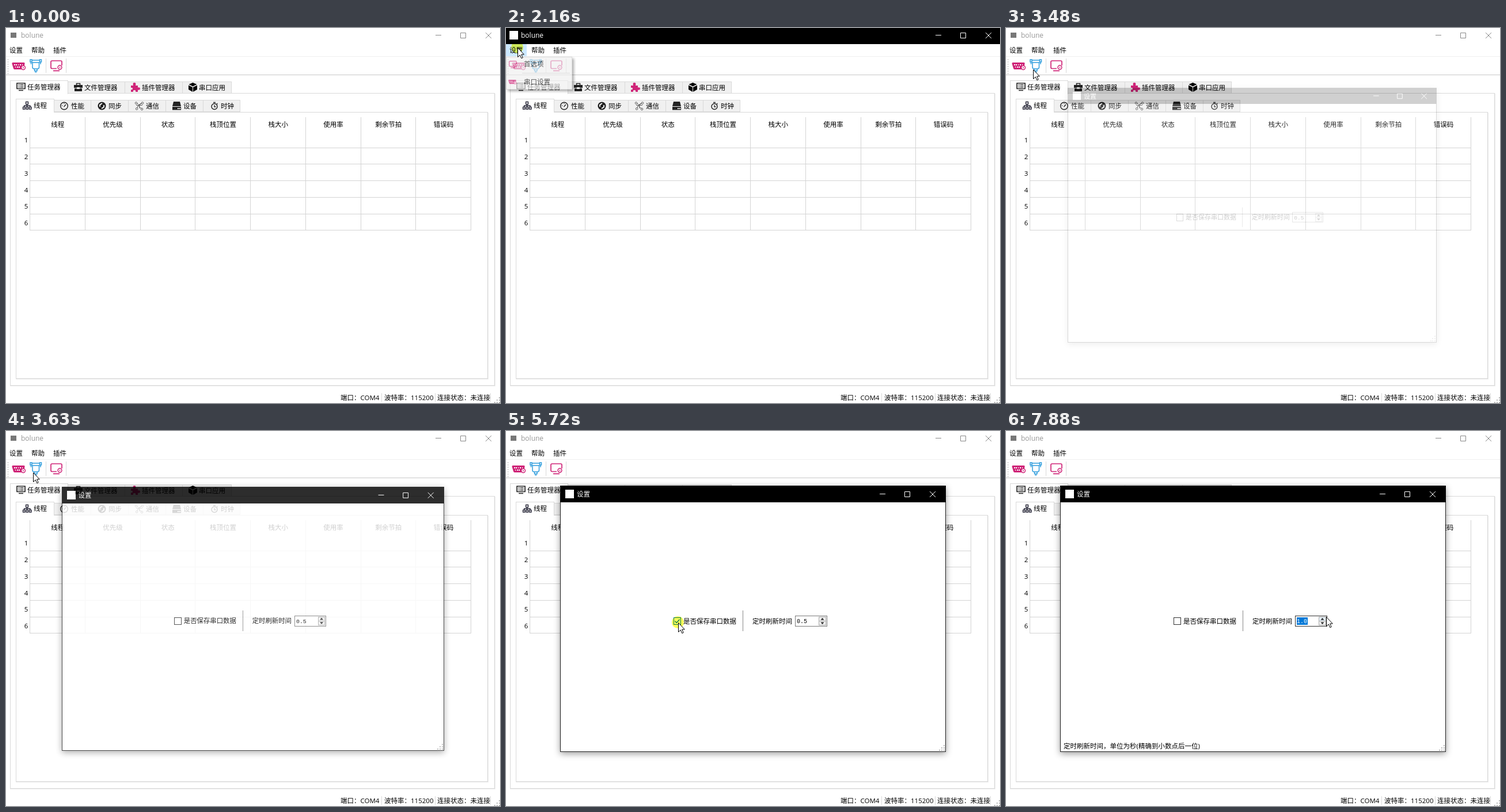
Animation, 858 px wide and 652 px high, one loop 8000 ms. Source, as an HTML page:

```html
<!DOCTYPE html>
<html lang="zh">
<head>
<meta charset="utf-8">
<style>
html, body { margin: 0; width: 100%; height: 100%; overflow: hidden; background: #fff }
svg { display: block; width: 858px; height: 652px }
text { font: 11.5px "Open Sans", "Noto Sans CJK SC", "Noto Sans CJK", sans-serif; white-space: pre }
.mono { font: 10px "Liberation Mono", monospace }
.title { font-size: 12px }
rect { shape-rendering: crispEdges }
.shadow { filter: drop-shadow(0 3px 6px #0006) }
.menuShadow { filter: drop-shadow(3px 3px 2px #0007) }
</style>
</head>
<body>
<svg id="stage" viewBox="0 0 858 652"></svg>
<script>
const PINK = '#cf2478', EDGE = '#d9d9d9', INK = '#222', BLUE = '#0078d7';

// Drawing helpers; text is placed by its vertical centre.
const rect = (x, y, w, h, fill, more = '') => `<rect x="${x}" y="${y}" width="${w}" height="${h}" fill="${fill}" ${more}/>`;
const box = (x, y, w, h, stroke, fill = 'none', more = '') =>
  rect(x + .5, y + .5, w - 1, h - 1, fill, `stroke="${stroke}" ${more}`);
const text = (x, cy, s, fill = '#000', more = '') => `<text x="${x}" y="${cy + 4.3}" fill="${fill}" ${more}>${s}</text>`;
const line = (d, stroke = INK, w = 1, fill = 'none') => `<path d="${d}" stroke="${stroke}" stroke-width="${w}" fill="${fill}"/>`;
const solid = (d, fill = INK) => `<path d="${d}" fill="${fill}"/>`;
const circle = (x, y, r, fill, stroke = 'none', w = 1) =>
  `<circle cx="${x}" cy="${y}" r="${r}" fill="${fill}" stroke="${stroke}" stroke-width="${w}"/>`;
const group = (id, body, more = '') => `<g id="${id}" ${more}>${body}</g>`;
const at = (x, y, s, body) => `<g transform="translate(${x} ${y}) scale(${s})">${body}</g>`;
const range = (n, f) => Array.from({ length: n }, (_, i) => f(i)).join('');

const controls = (x, y, c) => line(
  `M${x} ${y + .5}h10M${x + 43.5} ${y - 3.5}h9v9h-9zM${x + 87} ${y - 4}l10 10m0 -10l-10 10`, c);
const grip = (x, y) => [[8, 0], [4, 4], [8, 4], [0, 8], [4, 8], [8, 8]]
  .map(([a, b]) => rect(x + a, y + b, 2, 2, '#b5b5b5')).join('');

const gear = (x, y) => circle(x, y, 3.4, '#fff', PINK, 1.5) + circle(x, y, 1, PINK);
const serial = solid('M2 0h19q2 0 1.6 2l-1.800 8q-.5 2-2 2h-14q-1.500 0-2-2l-2.400-8q-.4-2 1.600-2z', PINK)
  + range(5, i => rect(4 + i * 3.4, 3, 1.6, 1.6, '#fff')) + range(4, i => rect(5.5 + i * 3.4, 7, 1.6, 1.6, '#fff')) + gear(20, 9);
const screen = line('M11 14.500H3q-2 0-2-2V3q0-2 2-2h15q2 0 2 2v6M5 18.300h11', PINK, 1.7) + gear(16.5, 12.5);
const plug = line('M1 2h3v4h-3zM17.500 2h3v4h-3zM2.500 6v4M19 6v4M4 3h13.500M4 7h13.500M5 7v8q0 3 3 3h5.500q3 0 3-3V7M8.500 18v3.500h4.500V18M9 23.500h3.500', '#2f9ddd', 1.5);

const taskIcon = line('M19 96h14v9.500h-14zM22 108.500h8', INK, 1.7) + line('M21.500 99h2m1 0h6M21.500 102.500h2m1 0h6', INK, 1.3);
const toolIcon = solid('M118 99h15v5h-5v-1h-5v1h-5zM119 105h4v1h5v-1h4v5h-13z') + line('M122.500 99v-2.500h6V99', INK, 1.5);
const puzzleIcon = solid('M217 100h4q-1.500-5 2-5t2 5h4v3.500q4-1 4 2t-4 2v3.500h-4q1-3-2-3t-2 3h-4v-4q3 1 3-1.500t-3-1.500z', PINK);
const cubeIcon = solid('M324.500 95l7 3-7 3.500-7-3.500zM317 99.500l7 3.500v8l-7-4zM332 99.500l-7 3.500v8l7-4z', '#000');
const chartIcon = line('M34.500 128.500h4v4h-4zM29.500 137.500h3.500v3.500h-3.500zM35 137.500h3.500v3.500h-3.500zM40.500 137.500h3.500v3.500h-3.500zM36.500 132.500v5M31.500 137.500v-2.500h10.500v2.500', '#223', 1.3);
const gaugeIcon = circle(101, 135.5, 6.3, 'none', INK, 1.4) + line('M100.500 137l3.500-4M97 135h1M101 131v1', INK, 1.3);
const syncIcon = circle(166.5, 135.5, 7, INK) + line('M167 131l-4 2.500v3.500M166 140l4-2.500v-3.500', '#fff', 1.8);
const linkIcon = line('M228 131q3 5 9 3M235 131q-5 3-3 9M228 139q0-5 9-9M226 134q5 0 9 6', '#444', .9)
  + [[226, 130.5], [237, 130.5], [227, 140.5], [236, 141]].map(p => circle(...p, 1.7, '#fff', '#444', .9)).join('');
const diskIcon = solid('M291 128h11l2 8h-15zM289 137h15v5.500h-15z') + rect(298, 139, 1.5, 1.5, '#fff') + rect(301, 139, 1.5, 1.5, '#fff');
const clockIcon = circle(362, 136.5, 5, 'none', INK, 1.4) + line('M360 129.500h4M362 134v3h2.500M366 131l1.500 1.500', INK, 1.3);

// tabs: [left, width, label, labelX]; the first one is selected
const tabs = (y, list) => list.map(([x, w, s, tx], i) => i
  ? box(x, y + 2, w + 1, 21, EDGE, '#f0f0f0') + text(tx, y + 12.5, s)
  : box(x, y, w + 1, 24, EDGE, '#fff') + rect(x + 1, y + 22, w - 1, 3, '#fff') + text(tx, y + 11.3, s)).join('');
const pane = (x, y, w, h) => box(x, y, w, h, EDGE, '#fff') + rect(x + w, y + 1, 1, h, '#ececec') + rect(x, y + h, w + 1, 1, '#ececec');

const COL = 95.75, ROW = 28.75;
const heads = ['线程', '优先级', '状态', '栈顶位置', '栈大小', '使用率', '剩余节拍', '错误码'];
const table = heads.map((s, i) => text(89.8 + i * COL, 168, s, '#000', 'text-anchor="middle"')).join('')
  + range(9, i => rect(Math.floor(41.5 + i * COL), 155, 1, 197, '#d4d4d4'))
  + range(6, i => rect(41, Math.floor(208 + i * ROW), 767, 1, '#d4d4d4')
    + text(35, 195 + i * ROW, i + 1, '#000', 'text-anchor="middle"'));

const NAME = 'bolune';
const main = rect(0, 0, 858, 652, '#fff')
  + group('idle', rect(8, 8, 10, 9, '#777') + text(26, 13, NAME, '#999', 'class="title"') + controls(746, 12, '#888'))
  + group('active', rect(0, 0, 858, 28, '#000') + rect(6, 5, 15, 15, '#fff') + text(26, 13, NAME, '#fff', 'class="title"') + controls(746, 12, '#fff'))
  + rect(0, 28, 36, 21, '#e5f3ff', 'id="hover"')
  + text(6, 39, '设置') + text(44, 39, '帮助') + text(82, 39, '插件')
  + rect(0, 49, 858, 1, '#f0f0f0') + rect(0, 81, 858, 1, '#c8c8c8')
  + range(7, i => rect(3, 54 + i * 4, 1, 2, '#b5b5b5')) + rect(69, 53, 1, 25, EDGE) + rect(104, 53, 1, 25, EDGE)
  + at(10, 60, 1, serial) + at(41, 53, 1, plug) + at(77, 56, 1, screen)
  + pane(7, 113, 842, 509)
  + tabs(91, [[7, 100, '任务管理器', 37], [107, 99, '文件管理器', 136], [206, 100, '插件管理器', 236], [306, 85, '串口应用', 335]])
  + taskIcon + toolIcon + puzzleIcon + cubeIcon
  + pane(17, 146, 820, 464)
  + tabs(123, [[17, 66, '线程', 48], [83, 64, '性能', 113], [147, 65, '同步', 178], [212, 65, '通信', 243], [277, 65, '设备', 308], [342, 64, '时钟', 373]])
  + chartIcon + gaugeIcon + syncIcon + linkIcon + diskIcon + clockIcon
  + table
  + text(581, 643, '端口：COM4') + text(657, 643, '波特率：115200') + text(749, 643, '连接状态：未连接')
  + [652, 745, 841].map(x => rect(x, 635, 1, 15, EDGE)).join('') + grip(848, 642);

const menu = group('menu',
  box(0, 50, 115, 57, '#ccc', '#f0f0f0', 'class="menuShadow"')
  + rect(1, 52, 110, 22, '#91c9f7', 'id="item"')
  + at(5, 57, .66, screen) + text(31, 63, '首选项')
  + rect(28, 78, 83, 1, '#cfcfcf')
  + at(4, 90, .6, serial) + text(31, 94, '串口设置'));

const dialog = group('dialog',
  box(94, 95, 670, 463, INK, '#fff', 'class="shadow"')
  + rect(94, 95, 670, 29, '#000') + rect(103, 102, 15, 15, '#fff') + text(123, 110, '设置', '#fff') + controls(649, 109, '#fff')
  + box(291, 324, 13, 13, '#333', '#fff', 'id="check"') + group('tick', line('M293.500 330.500l2.700 3 5.300-6', BLUE, 1.3))
  + text(308, 330.5, '是否保存串口数据')
  + rect(411, 312, 1, 36, '#888')
  + text(428, 330.5, '定时刷新时间')
  + box(502, 321, 56, 19, '#7a7a7a', '#fff', 'id="spin"') + rect(505, 324, 19, 13, BLUE, 'id="pick"')
  + '<text id="value" class="mono" x="505" y="334"></text>'
  + box(543, 323, 13, 8, '#aaa', '#f0f0f0', 'id="up"') + box(543, 330, 13, 8, '#aaa', '#f0f0f0')
  + solid('M546.500 328.500l3-3.500 3 3.500zM546.500 332.500l3 3.500 3-3.500z')
  + group('tip', text(100, 547.5, '定时刷新时间，单位为秒(精确到小数点后一位)'))
  + grip(752, 546));

const pointer = group('halo', circle(0, 0, 10.5, '#ff0'), 'opacity=".65" style="mix-blend-mode:multiply"')
  + group('cursor', line('M.500 .500V16.500L4.200 13 6.800 18.700 9.200 17.600 6.700 12H11.300Z', '#000', 1, '#fff'));

document.getElementById('stage').innerHTML = main + menu + dialog + pointer;
const $ = id => document.getElementById(id);
const show = (id, on) => $(id).setAttribute('visibility', on ? 'visible' : 'hidden');
const set = (id, name, v) => $(id).setAttribute(name, v);

const LOOP = 8000, TICK = 77.25;
const path = [
  [10, 284, 638], [13, 130, 400], [16, 28, 130], [18, 8, 4], [20, 7, 29], [23, 20, 34],
  [34, 20, 34], [35, 27, 46], [37, 47, 75], [39, 47, 76], [41, 47, 72], [54, 47, 72],
  [55, 82, 104], [58, 232, 268], [61, 295, 337], [62, 295, 337], [65, 299, 333], [76, 299, 333],
  [80, 430, 338], [84, 554, 325], [85, 555, 324], [88, 555, 324], [89, 556, 323]];
const holds = [[27, 29], [43, 45], [65, 67], [74, 76], [90, 92], [93, 94], [96, 97], [98, 99], [100, 102]];
const clicks = [90, 93, 96, 98, 100];
const within = (k, a, b) => k >= a && k < b;

function cursorAt(k) {
  const i = path.findIndex(p => p[0] > k);
  if (i < 0) return path.at(-1).slice(1);
  if (!i) return path[0].slice(1);
  const [t, x, y] = path[i - 1], [u, v, w] = path[i], f = (k - t) / (u - t);
  return [x + (v - x) * f, y + (w - y) * f];
}

function draw(ms) {
  const k = Math.floor((ms + 17) / TICK);
  const [x, y] = cursorAt(k);
  set('cursor', 'transform', `translate(${Math.round(x)} ${Math.round(y)})`);
  set('halo', 'transform', `translate(${x - .5} ${y - .5})`);
  show('cursor', k >= 10);
  show('halo', holds.some(h => within(k, ...h)));

  const front = within(k, 27, 44);
  show('active', front);
  show('idle', !front);
  show('hover', within(k, 20, 44));
  set('hover', 'fill', front ? '#cce8ff' : '#e5f3ff');
  show('menu', front);
  set('menu', 'opacity', Math.min(1, (k - 26) / 3));
  set('item', 'opacity', k === 36 || k >= 40 ? 1 : 0);

  const open = k < 44 ? 0 : [.05, .18, .52, .82][k - 44] ?? 1;
  set('dialog', 'opacity', open);
  set('dialog', 'transform', `translate(398 304) scale(${.947 + .053 * open}) translate(-398 -304)`);
  set('tick', 'opacity', within(k, 66, 76) ? 1 : 0);
  set('check', 'stroke', within(k, 60, 78) ? BLUE : '#333');

  const count = clicks.filter(c => c <= k).length;
  $('value').textContent = ((5 + count) / 10).toFixed(1);
  set('value', 'fill', count ? '#fff' : '#000');
  set('pick', 'opacity', count ? 1 : 0);
  set('spin', 'stroke', count ? '#333' : '#7a7a7a');
  set('up', 'fill', k >= 89 ? '#e5f1fb' : '#f0f0f0');
  set('tip', 'opacity', k >= 89 ? 1 : 0);
}

const start = performance.now();
function frame() {
  draw((performance.now() - start) % LOOP);
  requestAnimationFrame(frame);
}
frame();
</script>
</body>
</html>
```
